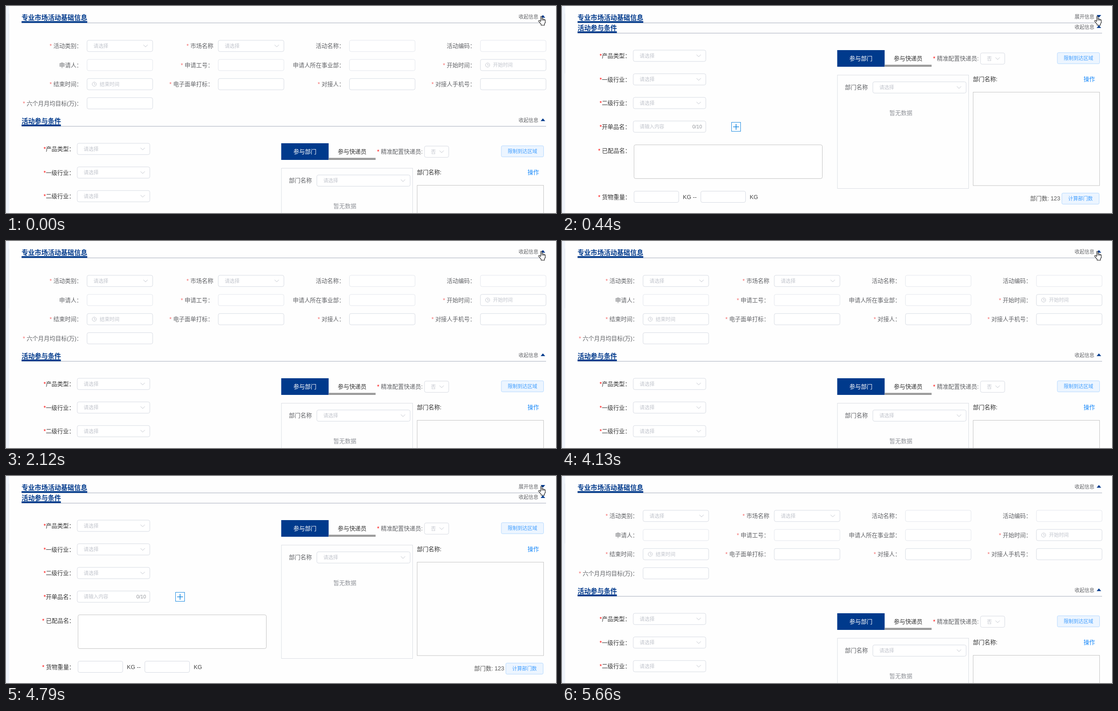
An HTML page for the animation above (6070 ms loop, 1218 by 460 pixels).

```html
<!DOCTYPE html>
<html lang="zh-CN">
<head>
<meta charset="utf-8">
<title>活动表单</title>
<style>
  html, body { margin: 0; width: 100%; height: 100%; overflow: hidden; background: #fefefe; }
  svg { display: block; }
  text { font-family: "Liberation Sans", "Noto Sans CJK SC", "Noto Sans CJK", sans-serif; white-space: pre; }
</style>
</head>
<body>
<svg id="stage" width="1218" height="460" viewBox="0 0 1218 460"></svg>
<script>
const LABEL = 12.73, SMALL = 10.91, TITLE = 14.55;
const NAVY = '#003a8c', BORDER = '#d6dae2', FAINT = '#e3e6ec', HINT = '#c0c4cc';
const stage = document.getElementById('stage');

function add(parent, tag, attrs, content) {
  const node = document.createElementNS('http://www.w3.org/2000/svg', tag);
  for (const key in attrs) node.setAttribute(key, attrs[key]);
  if (content) node.textContent = content;
  return parent.appendChild(node);
}

// cy is the optical middle of the line
function text(g, x, cy, content, fill, size = LABEL, extra = {}) {
  return add(g, 'text', { x, y: cy + size * 0.37, fill, 'font-size': size, ...extra }, content);
}

function label(g, x, cy, content, fill, starColor, anchor = 'start') {
  const starred = content[0] === '*';
  const node = text(g, x, cy, '', fill, LABEL, { 'text-anchor': anchor });
  if (starred) add(node, 'tspan', { fill: starColor }, '*');
  add(node, 'tspan', {}, starred ? content.slice(1) : content);
}

function box(g, x, y, w, h, stroke = BORDER, fill = '#fff', rx = 3.6) {
  add(g, 'rect', { x, y, width: w, height: h, rx, fill, stroke });
}

function bar(g, x, y, width, height, fill) {
  add(g, 'rect', { x, y, width, height, fill });
}

function line(g, d, stroke, width = 1) {
  add(g, 'path', { d, stroke, 'stroke-width': width, fill: 'none' });
}

function select(g, x, cy, w, hint = '请选择') {
  box(g, x, cy - 12.5, w, 25);
  text(g, x + 14.3, cy, hint, HINT, SMALL);
  line(g, `M${x + w - 20.5} ${cy - 2.5}l4.7 4.8 4.7-4.8`, HINT);
}

function datePicker(g, x, cy, w, hint) {
  box(g, x, cy - 12.5, w, 25);
  add(g, 'circle', { cx: x + 16, cy, r: 4.6, fill: 'none', stroke: HINT });
  line(g, `M${x + 16} ${cy - 2.6}v2.8h2.6`, HINT);
  text(g, x + 28, cy, hint, HINT, SMALL);
}

function button(g, x, y, w, content) {
  box(g, x, y, w, 24.5, '#b3d8ff', '#ecf5ff', 2.5);
  text(g, x + w / 2, y + 12.3, content, '#409eff', SMALL, { 'text-anchor': 'middle' });
}

function header(g, cy, title, width) {
  line(g, `M34.5 ${cy + 12}H1196`, '#a3abba');
  bar(g, 34.5, cy + 8, width, 3.8, NAVY);
  text(g, 34.5, cy, title, NAVY, TITLE, { 'font-weight': 700 });
}

function toggle(g, cy, content, up) {
  text(g, 1135.3, cy, content, '#606266', SMALL);
  const d = up ? `M1184 ${cy + 2}h10l-5-6z` : `M1184 ${cy - 4}h10l-5 6z`;
  add(g, 'path', { d, fill: NAVY });
}

// Page edge
bar(stage, 0, 0, 7, 460, '#eff3fa');
bar(stage, 6, 17, 1, 133, '#e0e5ef');

// First section
header(stage, 25.6, '专业市场活动基础信息', 145.5);
const opened = add(stage, 'g', {});
const closed = add(stage, 'g', {});
toggle(opened, 24, '收起信息', true);
toggle(closed, 24, '展开信息', false);

const columns = [179.5, 470.1, 760.6, 1050.6];
const fields = [
  ['*  活动类别：', 'select'], ['* 市场名称', 'select'], ['活动名称：', 'off'], ['活动编码：', 'off'],
  ['申请人：', 'off'], ['* 申请工号：', 'off'], ['申请人所在事业部：', 'off'], ['* 开始时间：', 'date', '开始时间'],
  ['* 结束时间：', 'date', '结束时间'], ['* 电子面单打标：', 'input'], ['* 对接人：', 'input'], ['* 对接人手机号：', 'input'],
  ['* 六个月月均目标(万)：', 'input']
];
fields.forEach(([name, kind, hint], i) => {
  const x = columns[i % 4], cy = 88.7 + 42.5 * Math.floor(i / 4), w = 145.3;
  label(opened, x - 10.9, cy - 0.4, name.replace('*  ', '* '), '#606266', '#f56c6c', 'end');
  if (kind === 'select') select(opened, x, cy, w);
  else if (kind === 'date') datePicker(opened, x, cy, w, hint);
  else box(opened, x, cy - 12.5, w, 25, kind === 'off' ? FAINT : BORDER);
});

// Second section, laid out in its collapsed place
const lower = add(stage, 'g', {});
header(lower, 48.3, '活动参与条件', 87);
toggle(lower, 46.7, '收起信息', true);

['*产品类型：', '*一级行业：', '*二级行业：', '*开单品名：'].forEach((name, i) => {
  const cy = 110.6 + 52.5 * i;
  label(lower, 83.2, cy, name, '#333', '#f00');
  if (i < 3) select(lower, 157.8, cy, 160.7);
  else {
    box(lower, 157.8, cy - 12.5, 160.7, 25);
    text(lower, 172, cy, '请输入内容', HINT, SMALL);
    text(lower, 310, cy, '0/10', '#909399', SMALL, { 'text-anchor': 'end' });
  }
});
box(lower, 375.5, 258.5, 20, 20, '#1989e0', '#fff', 0);
line(lower, 'M379 268.5h13M385.5 262v13', '#1989e0', 1.6);

label(lower, 80, 321.5, '* 已配品名：', '#333', '#f00');
box(lower, 159.5, 308.5, 417, 75, '#c4c4c4');
label(lower, 80, 424, '* 货物重量：', '#333', '#f00');
box(lower, 159.5, 411.5, 99, 25);
box(lower, 307.5, 411.5, 99, 25);
text(lower, 267.8, 424, 'KG --', '#444');
text(lower, 415.8, 424, 'KG', '#444');

bar(lower, 609.5, 98, 105, 37, NAVY);
bar(lower, 714.5, 130.5, 104, 4.5, '#999');
text(lower, 662, 116.3, '参与部门', '#fff', LABEL, { 'text-anchor': 'middle' });
text(lower, 766.5, 116.3, '参与快递员', '#333', LABEL, { 'text-anchor': 'middle' });
label(lower, 821.7, 116.3, '* 精准配置快递员:', '#606266', '#f00');
select(lower, 926.8, 116.8, 53.7, '否');
button(lower, 1097, 103.7, 93.5, '限制到达区域');

box(lower, 610, 153.5, 290.5, 252, '#dadde3', '#fefefe', 0);
text(lower, 626.5, 180.5, '部门名称', '#606266');
select(lower, 688.4, 181, 206.6);
text(lower, 750.5, 237.3, '暂无数据', '#909399', LABEL, { 'text-anchor': 'middle' });
text(lower, 910, 162, '部门名称:', '#333');
text(lower, 1155, 162.2, '操作', '#1989fa');
box(lower, 910.5, 191.5, 280, 207.5, '#c4c4c4', '#fefefe', 0);
text(lower, 1036.8, 427.5, '部门数: 123', '#555');
button(lower, 1107, 415.8, 82.5, '计算部门数');

// Hand pointer
const hand = add(stage, 'g', { 'stroke-linejoin': 'round' });
add(hand, 'path', {
  d: 'M5 2C5 .4 7.7 .4 7.7 2V6.6Q9.8 5.8 10.3 7.3 12.4 6.6 12.9 8.2 15.3 7.8 15.3 9.8V14L13.4 17.8V20.8H6V18.3L1 12.6C-.3 10.8 1.6 9.3 3 10.4L5 12.4Z',
  fill: '#fff', stroke: '#111', 'stroke-width': 1.1
});
line(hand, 'M7.7 6.6v4M10.3 7.3v3.6M12.9 8.2v3', '#111', 0.9);

// [start ms, section open, pointer top or null when hidden]
const steps = [
  [0, true, 22], [440, false, 22], [2120, true, 22], [2830, false, 22],
  [4130, true, 22], [4790, false, 22], [5510, true, 32], [5660, true, null]
];
const LOOP = 6070, SHIFT = 207;
const show = (node, on) => node.setAttribute('display', on ? 'inline' : 'none');
const origin = performance.now();

function draw(now) {
  const t = Math.max(0, now - origin) % LOOP;
  const [, open, top] = steps.filter(step => step[0] <= t).pop();
  show(opened, open);
  show(closed, !open);
  lower.setAttribute('transform', `translate(0 ${open ? SHIFT : 0})`);
  show(hand, top !== null);
  hand.setAttribute('transform', `translate(1179 ${top ?? 0})`);
  requestAnimationFrame(draw);
}
draw(origin);
</script>
</body>
</html>
```
